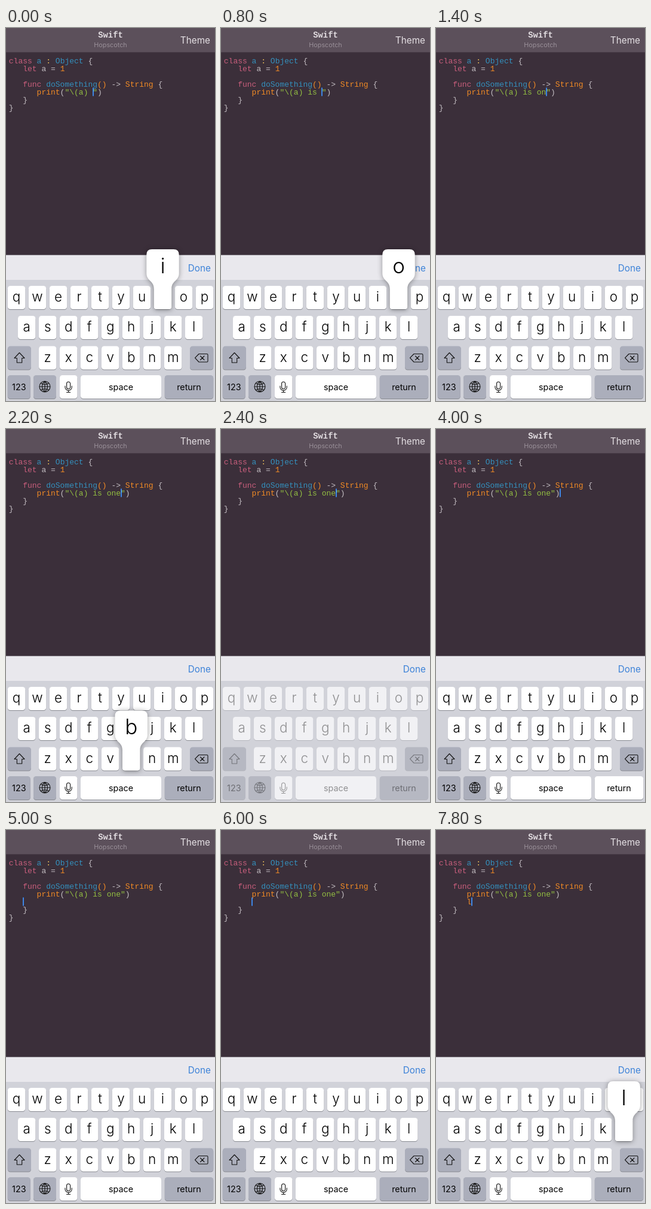
Recreate the animation shown at these times as an HTML page. Size 350 by 622 pixels, loop 8 s.

```html
<!DOCTYPE html>
<html lang="en">
<head>
<meta charset="utf-8">
<title>Code editor typing</title>
<style>
html, body { margin: 0; width: 100%; height: 100%; overflow: hidden; background: #3b2f3a; }
svg { display: block; width: 350px; height: 622px; }
text { font-family: Inter, "Open Sans", sans-serif; }
.code text, .title { font-family: "Liberation Mono", "DejaVu Sans Mono", monospace; font-size: 13px; white-space: pre; }
.title { font-weight: 700; font-size: 13.9px; }
.k { fill: #c85e7c; }
.b { fill: #3490bd; }
.o { fill: #f28b25; }
.y { fill: #f0c25a; }
.g { fill: #93bf42; }
.w { fill: #c3bdc2; }
.icon { fill: none; stroke: #111; stroke-width: 1.1; stroke-linejoin: round; stroke-linecap: round; }
.mid { text-anchor: middle; }
.letter { font-size: 22.5px; font-weight: 300; }
#popup { filter: drop-shadow(0 1px 4px rgba(0, 0, 0, .38)); }
</style>
</head>
<body>
<svg viewBox="0 0 350 622">
  <rect width="350" height="622" fill="#3b2f3a"/>
  <rect width="350" height="40.5" fill="#5c505b"/>
  <rect y="40" width="350" height="1" fill="#493d48"/>
  <text class="title mid" x="175" y="16" fill="#e2dde1">Swift</text>
  <text class="mid" x="175" y="32" font-size="10.8" fill="#9a9099">Hopscotch</text>
  <text x="342" y="26" font-size="15.3" text-anchor="end" fill="#e6e1e5">Theme</text>
  <g class="code" id="code"></g>
  <rect id="caret" width="2" height="14" fill="#3d86e6"/>
  <rect y="378.6" width="350" height="41.4" fill="#e9e8ed"/>
  <text x="343" y="405.5" font-size="15.3" text-anchor="end" fill="#3c82d8">Done</text>
  <rect y="420" width="350" height="202" fill="#d1d2d9"/>
  <g id="shadows"></g>
  <g id="keys"></g>
  <g id="labels"></g>
  <g id="popup">
    <path id="bubble" fill="#fff"/>
    <text id="big" class="mid" font-size="35" font-weight="300"/>
  </g>
</svg>
<script>
const $ = id => document.getElementById(id);
const CHAR = 7.8, LINE = 13, KEY_W = 29.4, KEY_H = 39;
const WHITE = [255, 255, 255], GREY = [171, 174, 187];
const BLANK = { light: [232, 231, 236], dark: [189, 190, 198] };
const colX = col => 4.8 + col * CHAR;

// Keyboard
const keys = {};
const addKey = (id, x, y, w, dark) => { keys[id] = { x, y, w, dark }; };
[["qwertyuiop", 2.8, 430], ["asdfghjkl", 20, 480], ["zxcvbnm", 55, 530.5]].forEach(([row, x, y]) =>
  [...row].forEach((c, i) => addKey(c, x + i * 35, y, KEY_W, false)));
addKey("shift", 2.8, 530.5, 39.2, true);
addKey("delete", 308, 530.5, 39.2, true);
addKey("123", 2.8, 579, 38, true);
addKey("globe", 46, 579, 38, true);
addKey("mic", 90, 579, KEY_W, false);
addKey("space", 125, 579, 135, false);
addKey("return", 265.8, 579, 81.4, true);

const icons = {
  shift: "M22.5 541.5 L31 550.5 H26.7 V558 H18.3 V550.5 H14 Z",
  delete: "M323 543.5 H336.5 Q338 543.5 338 545 V555.5 Q338 557 336.5 557 H323 L316.5 550.2 Z M325.5 547 L332 553.5 M332 547 L325.5 553.5",
  globe: "M56 598 a9 9 0 1 0 18 0 a9 9 0 1 0 -18 0 M65 589 V607 M56 598 H74 M65 589 C59 594 59 602 65 607 C71 602 71 594 65 589 M58.5 592.5 Q65 596 71.5 592.5 M58.5 603.5 Q65 600 71.5 603.5",
  mic: "M101.6 593 a3 3 0 0 1 6 0 V599 a3 3 0 0 1 -6 0 Z M99 597 V599 a5.6 5.6 0 0 0 11.2 0 V597 M104.6 604.6 V607.5 M101.5 607.5 H107.7"
};

function label(id, k) {
  if (icons[id]) return `<path class="icon" d="${icons[id]}"/>`;
  const letter = id.length === 1;
  const style = letter ? 'class="mid letter"' : 'class="mid" font-size="14.3"';
  return `<text ${style} x="${k.x + k.w / 2}" y="${k.y + (letter ? 26 : 24.5)}">${id}</text>`;
}

const ids = Object.keys(keys);
const keyRect = (k, dy, attr) =>
  `<rect x="${k.x}" y="${k.y + dy}" width="${k.w}" height="${KEY_H}" rx="4.5" ${attr}/>`;
$("shadows").innerHTML = ids.map(id => keyRect(keys[id], 1, 'fill="#898b92"')).join("");
$("keys").innerHTML = ids.map(id => keyRect(keys[id], 0, "")).join("");
$("labels").innerHTML = ids.map(id => label(id, keys[id])).join("");
const caps = [...$("keys").children];

function bubblePath({ x, y, w }) {
  const top = y - 61, left = x - 12.5, right = x + w + 12.5, end = y + KEY_H, r = 9;
  return `M${left + r} ${top} H${right - r} Q${right} ${top} ${right} ${top + r} V${top + 40}
    C${right} ${top + 53} ${x + w} ${top + 52} ${x + w} ${top + 66}
    V${end - 4} Q${x + w} ${end} ${x + w - 4} ${end} H${x + 4} Q${x} ${end} ${x} ${end - 4}
    V${top + 66} C${x} ${top + 52} ${left} ${top + 53} ${left} ${top + 40}
    V${top + r} Q${left} ${top} ${left + r} ${top} Z`;
}

// Code: each line is an indent followed by [class, text] runs
function codeLines({ typed, split, next }) {
  const lines = [
    [0, ["k", "class "], ["b", "a "], ["y", ": "], ["b", "Object "], ["w", "{"]],
    [3, ["k", "let "], ["w", "a = "], ["o", "1"]],
    [0],
    [3, ["k", "func "], ["b", "doSomething"], ["o", "()"], ["w", " -> "], ["o", "String "], ["w", "{"]],
    [6, ["o", "print"], ["w", "("], ["g", `"\\(a) ${typed}"`], ["w", ")"]]
  ];
  if (split) lines.push([6, ["o", next]]);
  return lines.concat([[3, ["w", "}"]], [0, ["w", "}"]]]);
}

function drawCode(state) {
  $("code").innerHTML = codeLines(state).map(([indent, ...runs], i) => {
    const spans = runs.map(([c, s]) => `<tspan class="${c}">${s.replace(/ /g, "\u00a0").replace(/>/g, "&gt;")}</tspan>`);
    return `<text x="${colX(indent)}" y="${58.5 + i * LINE}">${spans.join("")}</text>`;
  }).join("");
}

// Each step overrides the state before it; "key" lasts for one step
const start = { typed: "", split: false, next: "", col: 18, row: 4, caret: 1, blank: 0, drift: 0 };
const steps = [
  [0, { key: "i" }],
  [200, { typed: "i", col: 19 }],
  [400, { key: "s" }],
  [600, { typed: "is", col: 20, key: "space" }],
  [800, { typed: "is ", col: 21, key: "o" }],
  [1000, { typed: "is o", col: 22 }],
  [1200, { key: "n" }],
  [1400, { typed: "is on", col: 23 }],
  [1600, { key: "e" }],
  [1800, { typed: "is one", col: 24 }],
  [2000, {}],
  [2200, { key: "b" }],
  [2400, { blank: 0.6 }],
  [2600, { blank: 1, caret: 0.6, drift: 2 }],
  [2800, { drift: 6 }],
  [3000, { drift: 11 }],
  [3200, { drift: 17 }],
  [3400, { drift: 22 }],
  [3600, { drift: 16, caret: 1 }],
  [3800, { drift: 0, col: 26, blank: 0 }],
  [4000, { key: "return" }],
  [4200, { split: true, col: 3, row: 5 }],
  [4600, { caret: 0.4 }],
  [4800, { caret: 0 }],
  [5000, { caret: 1 }],
  [5200, { col: 4, key: "space" }],
  [5400, { col: 5 }],
  [5600, { col: 6, key: "space" }],
  [5800, {}],
  [6200, { caret: 0.4 }],
  [6600, { caret: 0 }],
  [6800, { caret: 1 }],
  [7000, { caret: 0.4 }],
  [7200, { caret: 0 }],
  [7400, { caret: 1 }],
  [7800, { next: "l", col: 7, key: "l" }]
];
let last = start;
const timeline = steps.map(([at, change]) => (last = { ...last, key: null, ...change, at }));

const mix = (a, b, p) => `rgb(${a.map((v, i) => Math.round(v + (b[i] - v) * p))})`;

function draw(s) {
  drawCode(s);
  const caret = $("caret");
  caret.setAttribute("x", Math.round(colX(s.col) + s.drift - 0.5));
  caret.setAttribute("y", 47.5 + s.row * LINE + (s.drift ? 1 : 0));
  caret.setAttribute("height", s.drift ? 16 : 14);
  caret.setAttribute("opacity", s.caret);

  ids.forEach((id, i) => {
    const k = keys[id];
    const pressed = id === s.key && id.length > 1;
    const dark = k.dark !== pressed;
    caps[i].setAttribute("fill", mix(dark ? GREY : WHITE, k.dark ? BLANK.dark : BLANK.light, s.blank));
  });
  $("shadows").setAttribute("opacity", 1 - s.blank);
  $("labels").setAttribute("opacity", 1 - s.blank);

  const popped = s.key && s.key.length === 1;
  $("popup").style.display = popped ? "" : "none";
  if (popped) {
    const k = keys[s.key];
    $("bubble").setAttribute("d", bubblePath(k));
    $("big").textContent = s.key;
    $("big").setAttribute("x", k.x + k.w / 2);
    $("big").setAttribute("y", k.y - 21.5);
  }
}

const LOOP = 8000, begin = performance.now();
let shown = null;
function tick() {
  const t = (performance.now() - begin) % LOOP;
  const state = timeline.findLast(s => s.at <= t) || timeline[0];
  if (state !== shown) draw(shown = state);
  requestAnimationFrame(tick);
}
tick();
</script>
</body>
</html>
```
